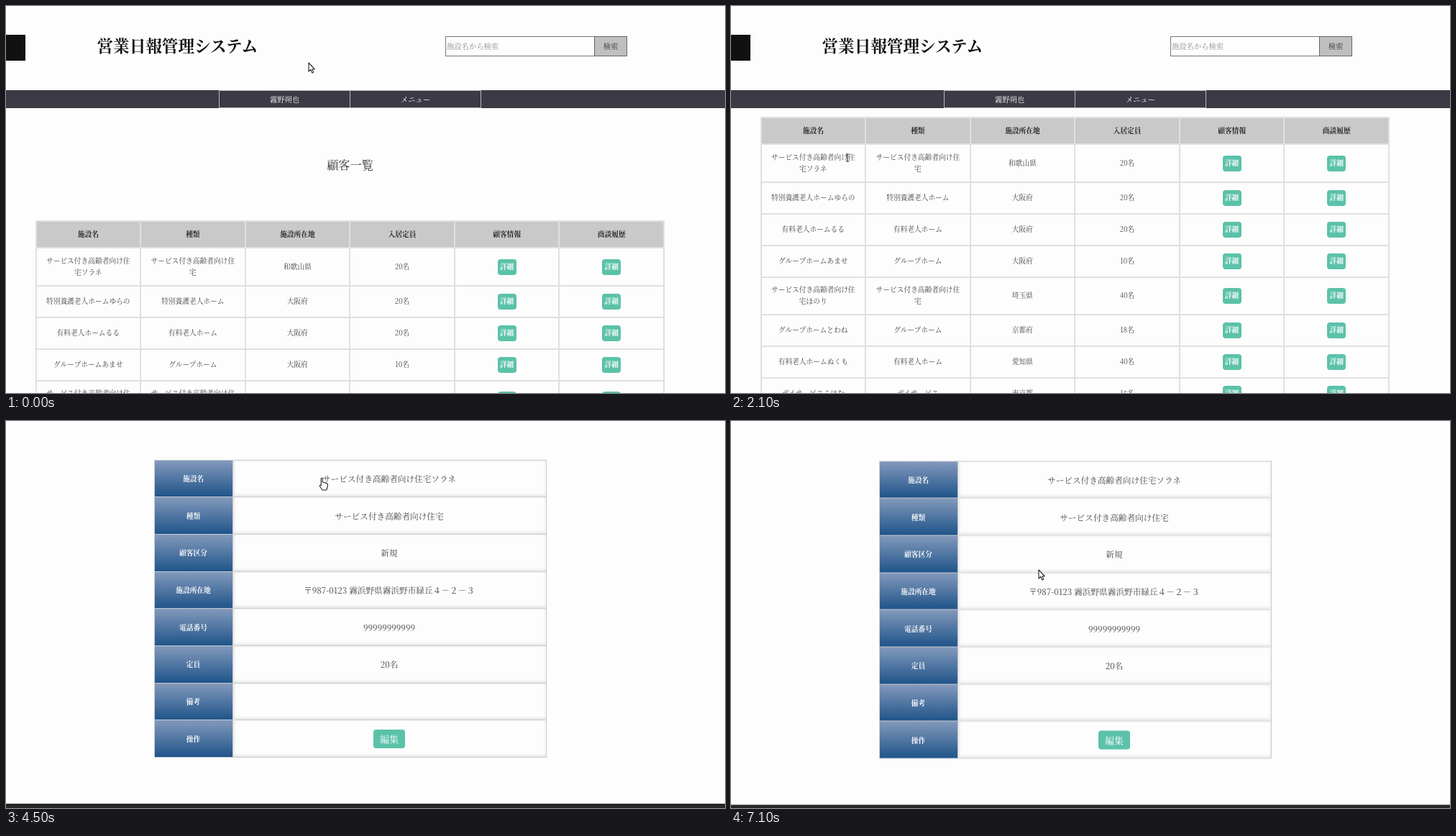
An HTML page for the animation above (7200 ms loop, 1000 px wide and 538 px high).

```html
<!DOCTYPE html>
<html lang="ja">
<head>
<meta charset="utf-8">
<title>営業日報管理システム</title>
<style>
html, body { margin: 0; width: 100%; height: 100%; overflow: hidden; background: #fdfdfd; }
body { font-family: "Noto Serif CJK JP", "Noto Serif JP", "Noto Serif", "Noto Sans CJK JP", serif; color: #444; }
#stage { position: relative; width: 1000px; height: 538px; overflow: hidden; background: #fdfdfd; }
#stage div, #cursor { position: absolute; box-sizing: border-box; }
.page { left: 0; top: 0; width: 1000px; height: 1100px; }
.head { left: 0; top: 0; width: 1000px; height: 142px; background: #fdfdfd; }
.mark { top: 40px; width: 36px; height: 36px; background: #111; }
.bar { left: 0; top: 116.6px; width: 1000px; height: 25.8px; background: #3c3a45; }
.tab { top: 0; height: 25.8px; border: 1px solid #b8b8be; color: #fff; text-align: center; font-size: 10.3px; line-height: 23px; }
.brand { left: 126.5px; top: 37px; font-size: 22.6px; line-height: 34px; font-weight: 600; color: #111; white-space: nowrap; }
.field { left: 611px; top: 41.5px; width: 208px; height: 28.5px; border: 1px solid #777; padding-left: 1px; font-size: 10.3px; line-height: 26px; color: #8c8c8c; }
.find { left: 818px; top: 41.5px; width: 46px; height: 28.5px; border: 1px solid #666; background: #bfbfbf; font-size: 10.3px; line-height: 26px; text-align: center; color: #333; }
.title { left: 0; top: 206px; width: 957px; font-size: 16.2px; line-height: 28px; text-align: center; color: #333; }
#stage .grid { display: grid; }
#stage .grid div { position: static; display: flex; align-items: center; justify-content: center; text-align: center; }
.list { left: 40.5px; top: 297.5px; width: 875.5px; padding: 2px; gap: 2px; background: #e0e0e0; grid-template-columns: repeat(6, 1fr); font-size: 9.72px; line-height: 15.6px; }
.list div { padding: 0 13px; background: #fdfdfd; word-break: break-all; }
.list .th { background: #c9c9c9; color: #222; font-weight: 600; }
.info { left: 205.5px; top: 298.5px; width: 546px; padding: 1px; gap: 1px; background: #c8ccd2; grid-template-columns: 108px 1fr; grid-auto-rows: 50.7px; font-size: 11.65px; }
.info div { background: #fdfdfd; box-shadow: inset 0 -2px 4px #e3e3e6, inset 2px 0 3px #eee; }
.info .th { background: linear-gradient(#8299bb, #20548a); color: #fff; font-size: 9.72px; font-weight: 700; box-shadow: none; }
.grid .btn { padding: 0; background: #5bc2a9; color: #fff; border-radius: 4px; box-shadow: none; white-space: nowrap; }
.list .btn { width: 26px; height: 22px; font-weight: 700; }
.info .btn { width: 44px; height: 26px; font-size: 13px; }
.foot { left: 0; top: 777px; width: 1000px; height: 323px; background: #262626; color: #fff; }
.foot div { left: 0; width: 957px; text-align: center; }
#cursor { left: 0; top: 0; overflow: visible; }
#cursor path { fill: #fff; stroke: #222; stroke-width: 1.1; stroke-linejoin: round; }
</style>
</head>
<body>
<div id="stage">
  <div id="listPage">
    <div class="page" id="listBody">
      <div class="title">顧客一覧</div>
      <div class="grid list" id="list"></div>
    </div>
    <div class="head">
      <div class="mark" style="left:-9px"></div>
      <div class="brand">営業日報管理システム</div>
      <div class="field">施設名から検索</div>
      <div class="find">検索</div>
      <div class="bar">
        <div class="tab" style="left:296px;width:183px">霧野朔也</div>
        <div class="tab" style="left:478px;width:183px">メニュー</div>
      </div>
    </div>
  </div>
  <div class="page" id="infoPage">
    <div class="mark" style="left:462px"></div>
    <div class="bar"></div>
    <div class="title" id="infoTitle"></div>
    <div class="grid info" id="info"></div>
    <div class="foot">
      <div style="top:27px;font-size:11.65px;line-height:20px;font-weight:700">営業日報管理システムについて</div>
      <div style="top:55px;font-size:7.7px;line-height:14px">システム利用ガイド</div>
    </div>
  </div>
  <svg id="cursor" width="20" height="20"><path/></svg>
</div>
<script>
const $ = id => document.getElementById(id);
const cell = (html, cls = '') => `<div class="${cls}">${html}</div>`;

const SENIOR = 'サービス付き高齢者向け住宅', CARE = '特別養護老人ホーム', PAID = '有料老人ホーム',
      GROUP = 'グループホーム', DAY = 'デイサービス';
const facilities = [
  [SENIOR, 'ソラネ', '和歌山県', 20], [CARE, 'ゆらの', '大阪府', 20], [PAID, 'るる', '大阪府', 20],
  [GROUP, 'あませ', '大阪府', 10], [SENIOR, 'ほのり', '埼玉県', 40], [GROUP, 'とわね', '京都府', 18],
  [PAID, 'ぬくも', '愛知県', 40], [DAY, 'こはむ', '東京都', 15]
];
const detail = cell('詳細', 'btn');
$('list').style.gridTemplateRows =
  '35.8px ' + facilities.map(f => f[0] === SENIOR ? '50.7px' : '41.9px').join(' ');
$('list').innerHTML =
  ['施設名', '種類', '施設所在地', '入居定員', '顧客情報', '商談履歴'].map(h => cell(h, 'th')).join('') +
  facilities.map(([kind, name, place, size]) =>
    [kind + name, kind, place, size + '名', detail, detail].map(c => cell(c)).join('')).join('');

const chosen = SENIOR + facilities[0][1];
$('infoTitle').textContent = chosen + 'の詳細情報';
$('info').innerHTML = [
  ['施設名', chosen], ['種類', SENIOR], ['顧客区分', '新規'],
  ['施設所在地', '〒987-0123 霧浜野県霧浜野市緑丘４－２－３'], ['電話番号', '99999999999'],
  ['定員', '20名'], ['備考', ''], ['操作', cell('編集', 'btn')]
].map(([head, value]) => cell(head, 'th') + cell(value)).join('');

const shapes = {
  arrow: 'M0 0V12L2.8 9.4L4.8 14L6.8 13.1L4.9 8.8H8.4Z',
  hand: 'M2 1Q3.2-.4 4 1V6L8 7L11 8.5V12L9.5 17H4L0 11.5Q0 9.5 2 10.5Z',
  beam: 'M-2-5H2M0-5V5M-2 5H2'
};
const listScroll = [[500, 0], [800, 74.5], [1100, 144]];
const infoScroll = [[3700, 28], [4200, 129], [4500, 245], [4800, 314], [5000, 314], [5300, 243.5]];
const pointer = [
  [0, 421, 79], [400, 400, 84], [500, 400, 84], [800, 258, 114], [1300, 170, 200], [2100, 162, 211],
  [2400, 200, 213], [3000, 690, 219], [3200, 700, 221], [3700, 700, 221], [4000, 437, 79],
  [5300, 435, 79], [6100, 440, 320], [6500, 425, 150], [6600, 425, 150], [7100, 428, 207]
];
const kinds = [[0, 'arrow'], [1300, 'beam'], [2300, 'arrow'], [2900, 'hand'], [3400, 'arrow'],
               [4000, 'hand'], [4600, 'arrow']];

function at(keys, t) {
  const i = keys.findIndex(k => k[0] > t);
  if (i === 0) return keys[0].slice(1);
  if (i < 0) return keys[keys.length - 1].slice(1);
  const a = keys[i - 1], b = keys[i], u = (t - a[0]) / (b[0] - a[0]);
  return a.slice(1).map((v, j) => v + (b[j + 1] - v) * u);
}

function draw() {
  const t = Math.floor(performance.now() % 7200 / 100) * 100;
  const onList = t < 3400;
  $('listPage').style.display = onList ? '' : 'none';
  $('infoPage').style.display = onList ? 'none' : '';
  $('listBody').style.transform = `translateY(${-at(listScroll, t)[0]}px)`;
  $('infoPage').style.transform = `translateY(${-at(infoScroll, t)[0]}px)`;
  const [x, y] = at(pointer, t);
  const kind = kinds.filter(k => k[0] <= t).pop()[1];
  $('cursor').style.transform = `translate(${x}px,${y}px)`;
  $('cursor').firstChild.setAttribute('d', shapes[kind]);
  requestAnimationFrame(draw);
}
draw();
</script>
</body>
</html>
```
